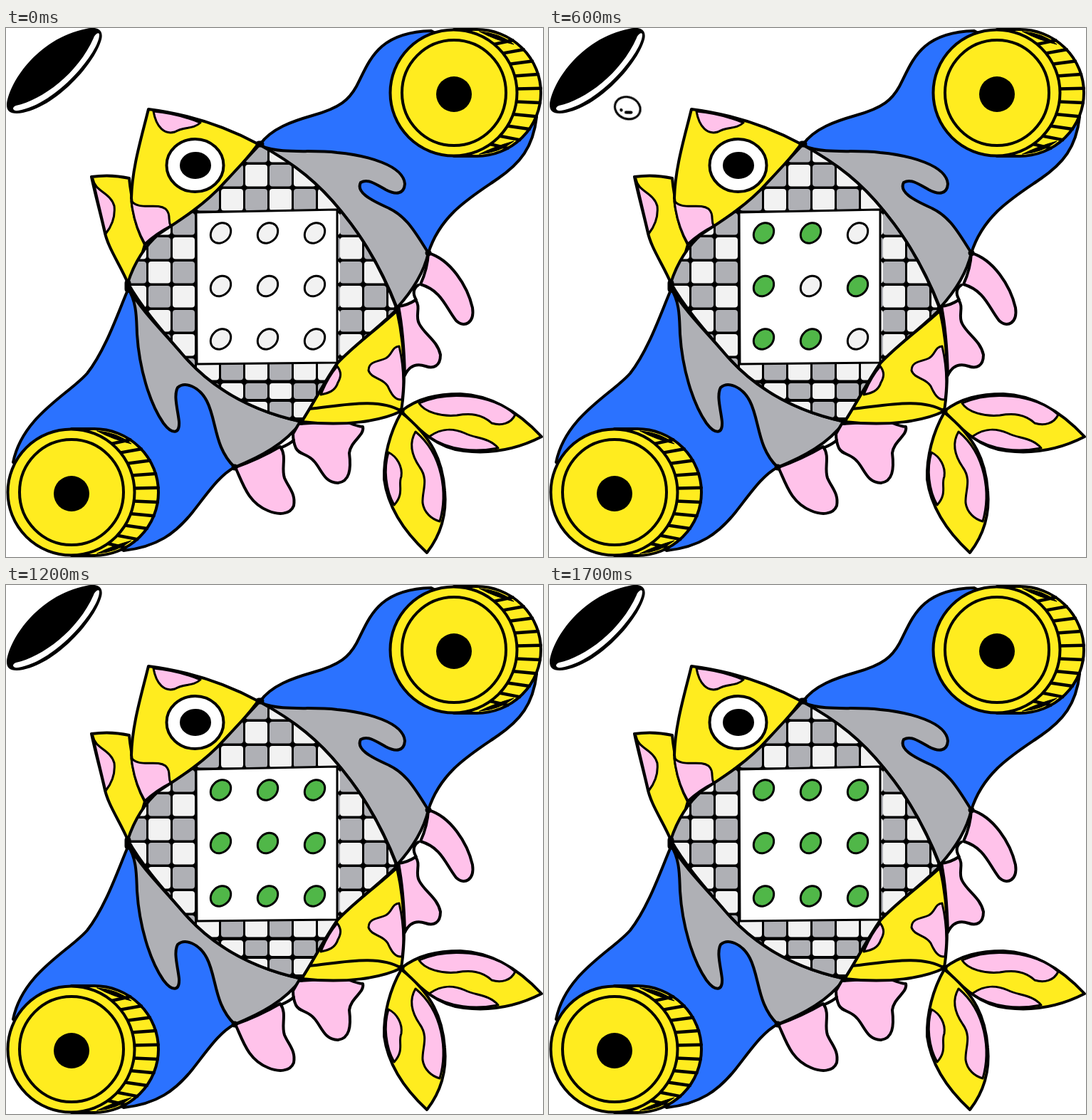
An HTML page for the animation above (1800 ms loop, 754 px wide and 743 px high).

```html
<!DOCTYPE html>
<html lang="en">
<head>
<meta charset="utf-8">
<title>Fish machine</title>
<style>
  html, body { margin: 0; width: 100%; height: 100%; overflow: hidden; background: #fff; }
  svg { display: block; width: 100%; height: 100%; }
  .ink { stroke: #000; stroke-width: 4; stroke-linejoin: round; stroke-linecap: round; fill: none; }
  .blue { fill: #2b72ff; }
  .yellow { fill: #ffec1f; }
  .pink { fill: #ffc2ea; }
  .gray { fill: #afb0b5; }
  .white { fill: #fff; }
  .thin { stroke-width: 3; }

  .ball { animation: roll 1.8s steps(18) infinite; }
  @keyframes roll {
    from { transform: translate(23.9px, 26.4px) rotate(-41deg); }
    to { transform: translate(283.1px, 284.4px) rotate(145deg); }
  }

  .lamp { fill: #f2f2f2; animation: 1.8s step-end infinite; }
  .blink { animation-name: blink; }
  .early { animation-name: early; }
  .late { animation-name: late; }
  @keyframes blink {
    0%, 44.44% { fill: #f2f2f2; }
    22.22%, 66.66% { fill: #50b748; }
  }
  @keyframes early {
    0% { fill: #f2f2f2; }
    22.22% { fill: #50b748; }
  }
  @keyframes late {
    0% { fill: #f2f2f2; }
    66.66% { fill: #50b748; }
  }
</style>
</head>
<body>
<svg viewBox="0 0 754 743" preserveAspectRatio="none">
  <defs>
    <clipPath id="exit">
      <path d="M2 107C3 80 40 15 115 1L134 0H320V320H0Z"/>
    </clipPath>
    <path id="hull" d="M356 164C404 190 440 218 475 263C505 300 530 345 549 395C520 424 488 446 465 471C445 500 432 527 415 553C340 537 285 503 245 455C218 424 190 392 171 358C180 330 193 308 215 289C245 270 280 247 305 219Z"/>
    <clipPath id="inside"><use href="#hull"/></clipPath>
    <g id="button" class="ink">
      <path class="yellow" d="M92 563H124A90 89 0 0 1 124 741H92Z"/>
      <path id="ridges" stroke-width="4.5"/>
      <path d="M128 566Q156 568 176 584Q150 578 128 566ZM128 738Q156 736 176 720Q150 727 128 738Z" fill="#000" stroke-width="1"/>
      <ellipse class="yellow" cx="91.500" cy="652" rx="89" ry="88.500"/>
      <ellipse cx="92" cy="652" rx="73" ry="74"/>
      <circle cx="92" cy="654" r="25" fill="#000" stroke="none"/>
    </g>
  </defs>

  <!-- hole and ball -->
  <path d="M1 108C3 80 42 15 113 1C130 -3 137 4 134 16C124 53 63 118 15 120C5 120 1 116 1 108Z"/>
  <path class="white" d="M131 9C132 32 72 107 17 116C10 117 7 112 14 109C51 101 101 64 123 14C125 9 130 5 131 9Z"/>
  <g clip-path="url(#exit)">
    <g class="ball ink">
      <ellipse class="white thin" rx="18.200" ry="15.200"/>
      <path d="M0 6.500L7 4M-7.500 5.500L-7 6" stroke-width="4"/>
    </g>
  </g>

  <g class="ink">
    <!-- arms -->
    <path class="blue" d="M357 163C373 141 402 131 430 123C470 112 482 100 492 82C510 48 520 6 597 4L700 60L745 125C740 168 722 190 690 212C652 238 610 262 593 316L480 260Z"/>
    <path class="blue" d="M171 368C158 398 140 452 114 485C89 514 23 545 10 610L165 734C212 729 238 710 262 680C284 652 300 628 321 617L300 480Z"/>
    <path class="gray" d="M358 166C392 178 425 170 465 175C508 179 558 193 560 219C559 233 548 235 533 227C519 219 508 211 498 217C491 230 511 241 533 251C562 263 574 286 593 316C586 346 570 370 549 393C530 345 505 300 475 263C440 218 404 190 358 166Z"/>
    <path class="gray" d="M171 365C184 386 183 407 184 430C187 477 201 526 221 555C233 571 244 571 243 553C241 535 235 516 241 505C251 496 271 503 282 524C296 551 292 589 321 617C358 602 392 584 415 553C340 537 285 503 245 455C218 424 190 396 171 365Z"/>

    <!-- fins -->
    <path class="pink" d="M593 316C624 325 648 362 655 393C658 414 644 422 632 411C617 392 612 369 582 360Q592 338 593 316Z"/>
    <path d="M579 361Q568 368 576 382"/>
    <path class="pink" d="M551 391Q565 389 575 382C583 392 574 404 580 415C587 430 606 439 610 459C610 475 600 479 589 475C574 470 565 477 560 488C559 450 557 421 551 391Z"/>
    <path class="pink" d="M411 556L475 552Q494 560 501 560C504 572 484 580 482 597C485 621 482 637 466 639C447 639 443 620 433 609C423 597 412 600 407 590Q403 581 403 570Z"/>
    <path d="M385 590Q399 584 404 579"/>
    <path class="pink" d="M322 617Q354 606 385 588C395 602 386 617 391 632C397 646 407 654 404 671C399 684 382 684 368 678C340 667 333 641 322 617Z"/>

    <!-- tail -->
    <path class="yellow" d="M555 538C578 520 605 514 638 514C686 516 724 544 752 574C713 594 676 598 643 594C606 590 581 566 555 538Z"/>
    <path class="pink thin" d="M580 527C621 509 681 514 715 543C709 556 695 559 682 555C668 542 652 541 633 544C612 546 588 540 580 527Z"/>
    <path class="pink thin" d="M594 574C612 561 628 562 644 569C660 577 678 575 691 590C660 596 622 594 594 574Z"/>
    <path class="yellow" d="M555 540C539 568 530 602 531 634C537 678 564 712 591 737C612 710 619 682 616 650C613 608 599 575 555 540Z"/>
    <path class="pink thin" d="M537 596C549 602 557 616 555 630C550 642 560 653 545 670C533 649 530 619 537 596Z"/>
    <path class="pink thin" d="M575 567C565 584 570 601 581 617C594 635 584 650 585 667C587 681 598 690 609 693C620 655 614 599 575 567Z"/>

    <!-- rear body -->
    <path class="yellow" d="M549 397C559 442 562 492 555 538C527 552 477 560 415 553C432 527 445 500 465 471C488 446 520 424 549 397Z"/>
    <path d="M425 535C467 531 522 518 555 538"/>
    <path class="pink thin" d="M552 447C541 448 543 459 533 464C522 469 509 468 509 481C513 493 529 491 536 503C541 514 546 523 556 522Q561 486 552 447Z"/>
    <path class="pink thin" d="M465 475C472 484 470 491 466 498C462 511 451 513 442 515Q451 492 465 475Z"/>

    <!-- head -->
    <path class="yellow" d="M120 209Q147 205 173 211C176 244 185 275 195 304Q188 333 171 358C159 330 143 309 138 284C132 258 126 237 120 209Z"/>
    <path class="pink thin" d="M122 212C125 230 147 231 152 250C154 268 147 280 140 289C134 264 128 239 122 212Z"/>
    <path class="yellow" d="M200 114C255 121 304 136 354 163Q334 190 305 219C280 247 245 270 215 289L195 304C184 284 178 260 176 239C177 196 190 155 200 114Z"/>
    <path class="pink thin" d="M207 117C211 140 223 150 237 146C250 138 262 143 273 133C251 124 229 119 207 117Z"/>
    <path class="pink thin" d="M176 243C188 257 211 245 224 254C232 262 227 269 231 278Q211 288 195 303C184 284 178 262 176 243Z"/>
    <ellipse class="white" cx="265.500" cy="193" rx="40" ry="37"/>
    <ellipse cx="266" cy="193" rx="20" ry="17" fill="#000"/>
  </g>

  <!-- tiled hull -->
  <g clip-path="url(#inside)">
    <path d="M150 150H570V570H150Z"/>
    <g id="tiles"></g>
  </g>
  <use href="#hull" class="ink"/>
  <path class="ink white thin" d="M267 259L465 255V470L268 472Z"/>
  <g id="lamps" class="ink thin"></g>
  <path class="ink" style="stroke-width:9" d="M171 358V367M355 163H358M593 316H593.100M549 394V397M415 553H414M321 617H321.100M555 538H555.100"/>

  <use href="#button"/>
  <use href="#button" x="537" y="-561"/>
</svg>
<script>
  const fill = (id, html) => { document.getElementById(id).innerHTML = html; };

  // Checkerboard; inverted right of the panel, with shorter rows at the bottom.
  let tiles = "";
  for (let r = -2; r < 10; r++) {
    for (let c = -4; c < 8; c++) {
      const low = r > 7, flip = c > 3 && r > 0;
      const x = 302 + 34 * c - (c > 4 ? 3 : 0);
      const y = low ? 499 + 26 * (r - 8) : 226 + 34 * r;
      const dark = (c + r + flip) & 1;
      tiles += `<rect x="${x}" y="${y}" width="31" height="${low ? 22 : 30.5}" rx="4" fill="${dark ? "#afb0b5" : "#f2f2f2"}"/>`;
    }
  }
  fill("tiles", tiles);

  const kinds = ["blink", "early", "late", "early", "late", "blink", "blink", "early", "late"];
  fill("lamps", kinds.map((kind, i) => {
    const x = 301.5 + 66 * (i % 3), y = 288 + 74.5 * Math.floor(i / 3);
    return `<ellipse class="lamp ${kind}" rx="15.5" ry="12.8" transform="translate(${x} ${y}) rotate(-45)"/>`;
  }).join(""));

  let ridges = "";
  for (let deg = -56; deg <= 66; deg += 13) {
    const a = deg * Math.PI / 180, dx = 90 * Math.cos(a), dy = 89 * Math.sin(a);
    ridges += `M${90 + dx} ${652 + dy * 0.9}L${124 + dx} ${652 + dy}`;
  }
  document.getElementById("ridges").setAttribute("d", ridges);
</script>
</body>
</html>
```
